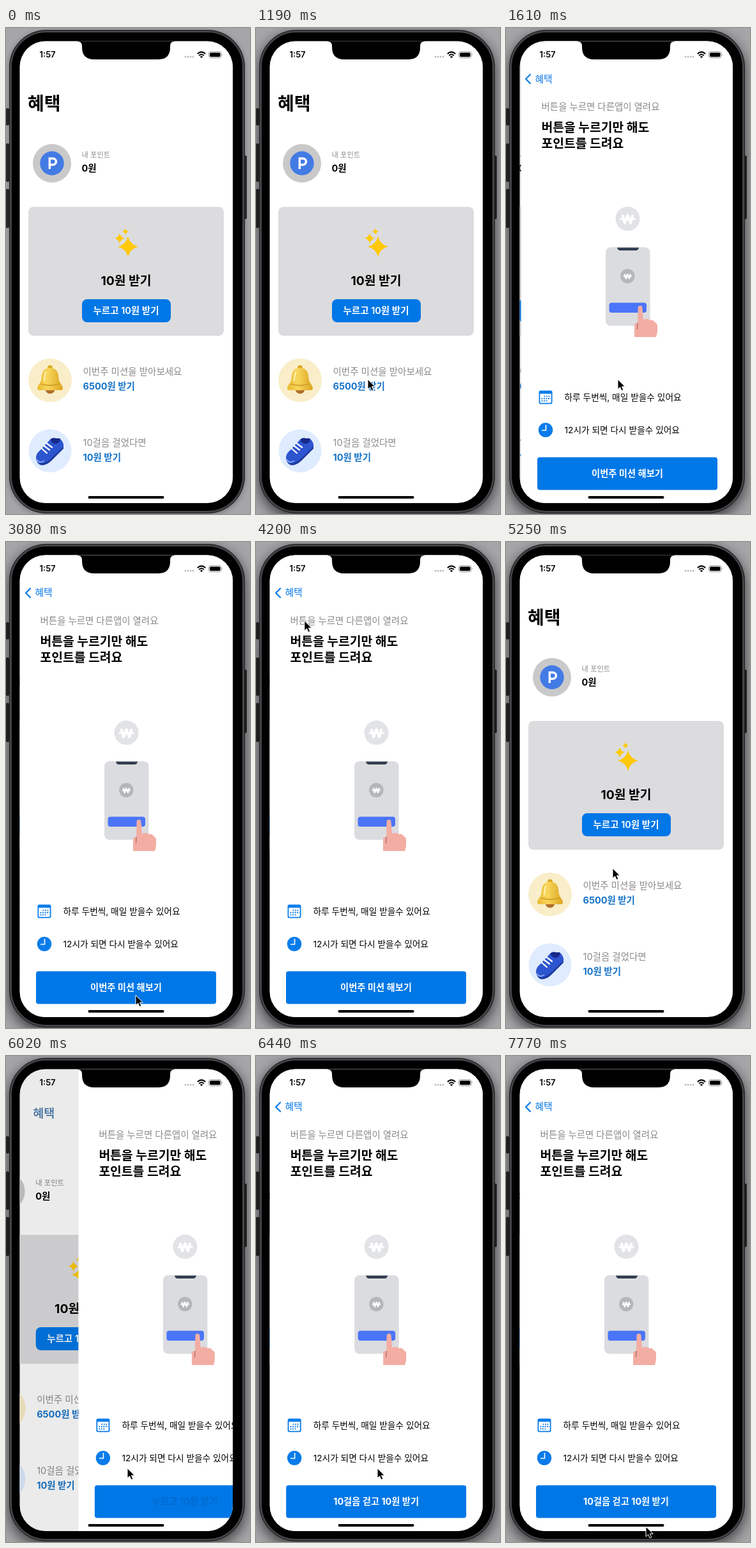
These frames come from a looping animation (382x758 px, 7.84 s). An HTML page:

```html
<!DOCTYPE html>
<html lang="ko">
<head>
<meta charset="utf-8">
<title>혜택</title>
<style>
  html, body { margin: 0; width: 100%; height: 100%; overflow: hidden; background: #a6a6a9; }
  #stage { position: relative; width: 382px; height: 758px; overflow: hidden; }
  #phone, .key { position: absolute; box-sizing: border-box; }
  #phone {
    left: 5px; top: 3px; width: 369px; height: 754px; border-radius: 58px;
    background: #000; border: 4px solid #434447;
    outline: 1px solid #1c1c1e; outline-offset: -1px;
    box-shadow: 0 2px 8px rgba(0, 0, 0, .3);
  }
  #phone.active { box-shadow: 0 7px 20px 1px rgba(0, 0, 0, .62); }
  .key { width: 5px; background: #2b2b2d; border-radius: 2px; }
  svg { position: absolute; left: 0; top: 0; }
  text { font-family: Inter, "Noto Sans CJK KR", "Noto Sans CJK", sans-serif; font-size: 14.5px; }
  .b { font-weight: 700; }
  .s { font-weight: 600; }
  .mid { text-anchor: middle; }
  .gray { fill: #8b8b8e; }
  .link { fill: #1673c8; }
  .white { fill: #fff; }
  .big { font-size: 19.3px; }
  .note { font-size: 13.7px; }
</style>
</head>
<body>
<div id="stage">
  <div class="key" style="left:0;top:125px;height:27px"></div>
  <div class="key" style="left:0;top:180px;height:60px"></div>
  <div class="key" style="left:0;top:251px;height:61px"></div>
  <div class="key" style="left:372px;top:199px;height:99px"></div>
  <div id="phone"></div>
  <svg width="382" height="758" viewBox="0 0 382 758">
    <defs>
      <clipPath id="screen"><rect x="21.5" y="20.5" width="333.5" height="720.5" rx="40"/></clipPath>
      <path id="star" d="M0-10Q2-2 10 0Q2 2 0 10Q-2 2-10 0Q-2-2 0-10Z"/>
      <g id="won" fill="none" stroke="#fff" stroke-linejoin="round">
        <path d="M-8-6.5L-4.5 6L0-5.5L4.5 6L8-6.5" stroke-width="4.2"/>
        <path d="M-12 0H12" stroke-width="3"/>
      </g>
      <linearGradient id="gold">
        <stop offset="0" stop-color="#e9b92f"/><stop offset=".4" stop-color="#f8d65c"/>
        <stop offset="1" stop-color="#dca520"/>
      </linearGradient>
    </defs>

    <g clip-path="url(#screen)">
      <rect x="21" y="20" width="335" height="722" fill="#fff"/>

      <g id="home">
        <circle cx="72" cy="211" r="30" fill="#c9c9ca"/>
        <circle cx="72" cy="211" r="18.7" fill="#437be5"/>
        <path d="M68.3 220V203.5H73.5A4.9 4.9 0 0 1 73.5 213.3H68.3" fill="none" stroke="#fff" stroke-width="3.4"/>
        <text x="118.5" y="202" class="gray" style="font-size:11.3px">내 포인트</text>
        <text x="118.5" y="224" class="b">0원</text>

        <rect x="35" y="279" width="306" height="201" rx="8" fill="#dcdcde"/>
        <g fill="#ffc90a">
          <use href="#star" transform="translate(191 341) scale(1.6)"/>
          <use href="#star" transform="translate(178 328) scale(.8)"/>
          <use href="#star" transform="translate(187 317.5) scale(.52)"/>
        </g>
        <text x="188" y="400.5" class="b mid big">10원 받기</text>
        <rect x="119" y="423" width="139" height="36" rx="8" fill="#0077e6"/>
        <text x="188" y="446" class="s mid white">누르고 10원 받기</text>

        <circle cx="69" cy="549.5" r="34" fill="#f9eec9"/>
        <circle cx="69" cy="563" r="7.5" fill="#b06f2c"/>
        <circle cx="69" cy="530" r="4" fill="#dba823"/>
        <path d="M69 530C58 530 56 538 55.500 546C55 554 49 557 49 562Q49 565 53 565H85Q89 565 89 562C89 557 83 554 82.500 546C82 538 80 530 69 530Z" fill="url(#gold)"/>
        <path d="M54 555Q69 560 84 555" fill="none" stroke="#c8921c" stroke-width="1.3"/>
        <path d="M62 537Q60 543 60 550" fill="none" stroke="#fff0a8" stroke-width="2.5" stroke-linecap="round"/>
        <text x="120.500" y="541" class="gray">이번주 미션을 받아보세요</text>
        <text x="120.500" y="564" class="b link">6500원 받기</text>

        <circle cx="69" cy="659.5" r="33.500" fill="#dfebfe"/>
        <path d="M48 671Q47 680 56 682Q64 682 72 674L90 656L90 650L50 668Z" fill="#1c3a9c"/>
        <path d="M47 670Q47 664 53 659L69 642Q72 639 75 642Q79 644 84 640Q91 646 90 653L72 670Q62 680 53 679Q47 677 47 670Z" fill="#2d55cf"/>
        <path d="M69 642Q73 638 78 640L84 640Q86 645 80 648Q73 650 69 642Z" fill="#17298a"/>
        <path d="M48 673Q52 680 60 675" fill="none" stroke="#7fa3f2" stroke-width="2"/>
        <path d="M56 656L64 663M60 652L68 658M64 648L72 654" stroke="#fff" stroke-width="2.300" stroke-linecap="round"/>
        <text x="120.500" y="652" class="gray">10걸음 걸었다면</text>
        <text x="120.500" y="675" class="b link">10원 받기</text>
      </g>
      <rect id="dim" x="21" y="20" width="335" height="722"/>

      <g id="detail">
        <rect x="21.500" y="20" width="335" height="722" fill="#fff"/>
        <text x="53.500" y="127.500" class="gray" style="font-weight:500">버튼을 누르면 다른앱이 열려요</text>
        <text x="53.500" y="162" class="b big">버튼을 누르기만 해도</text>
        <text x="53.500" y="187" class="b big">포인트를 드려요</text>

        <circle cx="188.500" cy="297.500" r="19" fill="#e2e3e6"/>
        <use href="#won" transform="translate(188.500 298)"/>
        <rect x="154" y="342" width="69.500" height="122.500" rx="8" fill="#dbdcdf"/>
        <path d="M172 342.500H206Q205 347 201 347H177Q173 347 172 342.500Z" fill="#303d4e"/>
        <circle cx="188.300" cy="387" r="11.200" fill="#b4b7ba"/>
        <use href="#won" transform="translate(188.300 387.300) scale(.57)"/>
        <rect x="159.500" y="428.500" width="58.500" height="15.500" rx="4" fill="#4b75f8"/>
        <path d="M204.500 437Q204.500 433 208 433Q211.500 433 211.500 437L213 455Q220 452 224 456Q229 454 231 459Q235 460 235 465V474L233 482H199V463Q199 460 204 460Z" fill="#f3ada3"/>
        <path d="M204 460L203.500 470" stroke="#a4695f" stroke-width="1.200"/>

        <g fill="#0a7cea">
          <path fill-rule="evenodd" d="M52 565.500H68Q70.500 565.500 70.500 568V584Q70.500 586.500 68 586.500H52Q49.500 586.500 49.500 584V568Q49.500 565.500 52 565.500ZM51.300 570.500V583.500Q51.300 584.800 52.500 584.800H67.500Q68.700 584.800 68.700 583.500V570.500Z"/>
          <circle cx="60" cy="627" r="11.200"/>
        </g>
        <path d="M57.500 574.500H68M53.500 578H68M53.500 581.500H64" stroke="#0a7cea" stroke-width="1.800" stroke-dasharray="1.800 1.700"/>
        <path d="M60.500 619V627.500H54" fill="none" stroke="#fff" stroke-width="1.600"/>
        <text x="89.500" y="580.500" class="note">하루 두번씩, 매일 받을수 있어요</text>
        <text x="89.500" y="632" class="note">12시가 되면 다시 받을수 있어요</text>

        <rect x="47" y="669.500" width="282" height="51" rx="4" fill="#0077e6"/>
        <text id="ghost" x="188" y="700" class="s mid" opacity=".1">누르고 10원 받기</text>
        <text id="action" x="188" y="700" class="b mid white" style="font-size:14.300px"></text>
      </g>

      <path id="chevron" d="M38 72.500L31 79.500L38 86.500" fill="none" stroke="#0a7ae8" stroke-width="2.200" stroke-linecap="round" stroke-linejoin="round"/>
      <text id="backLabel" fill="#0a7ae8">혜택</text>
      <text id="largeTitle" class="b">혜택</text>

      <path d="M112 20V21Q119 21 119 28V30Q119 49 138 49H238Q257 49 257 30V28Q257 21 264 21V20Z"/>
      <text x="52.500" y="46.300" class="s" style="font-size:13px">1:57</text>
      <g fill="#b9b9bc">
        <circle cx="281" cy="45" r="1.400"/><circle cx="285" cy="45" r="1.400"/>
        <circle cx="289" cy="45" r="1.400"/><circle cx="293" cy="45" r="1.400"/>
      </g>
      <path d="M299.800 40.300Q306 34.500 312.200 40.300M302.200 43Q306 39.600 309.800 43" fill="none" stroke="#000" stroke-width="2"/>
      <path d="M303.800 44.700Q306 42.900 308.200 44.700L306 47Z"/>
      <rect x="317.500" y="37" width="19.500" height="9.500" rx="3" fill="none" stroke="#8e8e90"/>
      <rect x="319" y="38.500" width="16.500" height="6.500" rx="1.700"/>
      <path d="M338.200 40Q339.800 41.700 338.200 43.500Z" fill="#8e8e90"/>
      <rect x="128.500" y="730" width="119" height="4" rx="2"/>
    </g>

    <path id="cursor" d="M0 0V15.500L3.600 12.200L6 17.800L8.800 16.600L6.400 11.200H11.300Z" stroke="#fff" stroke-width="1"/>
  </svg>
</div>
<script>
  const LOOP = 7840, STEP = 70, WIDTH = 333;
  const el = id => document.getElementById(id);
  const lerp = (a, b, k) => a + (b - a) * k;
  const clamp = v => Math.max(0, Math.min(1, v));

  // Pointer path: time, x, y
  const pointer = [
    [210, 172, 758], [700, 175, 548], [1890, 175, 548], [2310, 98, 690], [2730, 238, 711],
    [2870, 262, 704], [3010, 203, 707], [3080, 203, 707], [3570, 129, 333], [4410, 66, 84],
    [4830, 66, 84], [5250, 167, 509], [5600, 200, 648], [5740, 190, 643], [6580, 190, 643],
    [6930, 144, 712], [7420, 250, 712], [7560, 275, 657], [7700, 183, 722], [7770, 219, 734]
  ];

  function pointerAt(t) {
    const next = pointer.findIndex(p => p[0] >= t);
    if (next < 0) return pointer[pointer.length - 1].slice(1);
    if (next === 0) return pointer[0].slice(1);
    const [t0, x0, y0] = pointer[next - 1], [t1, x1, y1] = pointer[next];
    const u = (t - t0) / (t1 - t0), k = u * u * (3 - 2 * u);
    return [lerp(x0, x1, k), lerp(y0, y1, k)];
  }

  // Critically damped spring: share of the distance still to go
  function remaining(ms) {
    if (ms <= 0) return 1;
    if (ms > 560) return 0;
    const x = ms * 0.01826;
    return (1 + x) * Math.exp(-x);
  }

  // 1 = list fully visible, 0 = detail fully visible
  function listShare(t) {
    if (t < 4570) return remaining(t - 1215);
    return t < 5700 ? 1 - remaining(t - 4570) : remaining(t - 5880);
  }

  function placeTitle(node, share, opacity) {
    const size = lerp(14.8, 28, share);
    node.style.fontSize = size + 'px';
    node.setAttribute('x', lerp(45.5, 34, share));
    node.setAttribute('y', lerp(79, 118, share) + size * 0.36);
    node.setAttribute('opacity', opacity);
  }

  function render(t) {
    const share = listShare(t), second = t > 5700;
    el('phone').classList.toggle('active', t >= 1050);
    el('home').setAttribute('transform', `translate(${-0.3 * WIDTH * (1 - share)} 0)`);
    el('dim').setAttribute('opacity', 0.11 * (1 - share));
    el('detail').setAttribute('transform', `translate(${WIDTH * share} 0)`);
    el('chevron').setAttribute('opacity', clamp(1 - share * 4));
    placeTitle(el('backLabel'), share, 1 - share);
    placeTitle(el('largeTitle'), share, share);

    el('action').textContent = second ? '10걸음 걷고 10원 받기' : '이번주 미션 해보기';
    el('action').setAttribute('opacity', second ? clamp(1 - share * 3.7) : 1);
    el('ghost').setAttribute('visibility', second && share > 0.15 ? 'visible' : 'hidden');

    el('cursor').setAttribute('visibility', t >= 280 ? 'visible' : 'hidden');
    el('cursor').setAttribute('transform', `translate(${pointerAt(t).join(' ')})`);
  }

  let start;
  function tick(now) {
    start ??= now;
    const t = (now - start) % LOOP;
    render(Math.floor(t / STEP) * STEP);
    requestAnimationFrame(tick);
  }
  render(0);
  requestAnimationFrame(tick);
</script>
</body>
</html>
```
